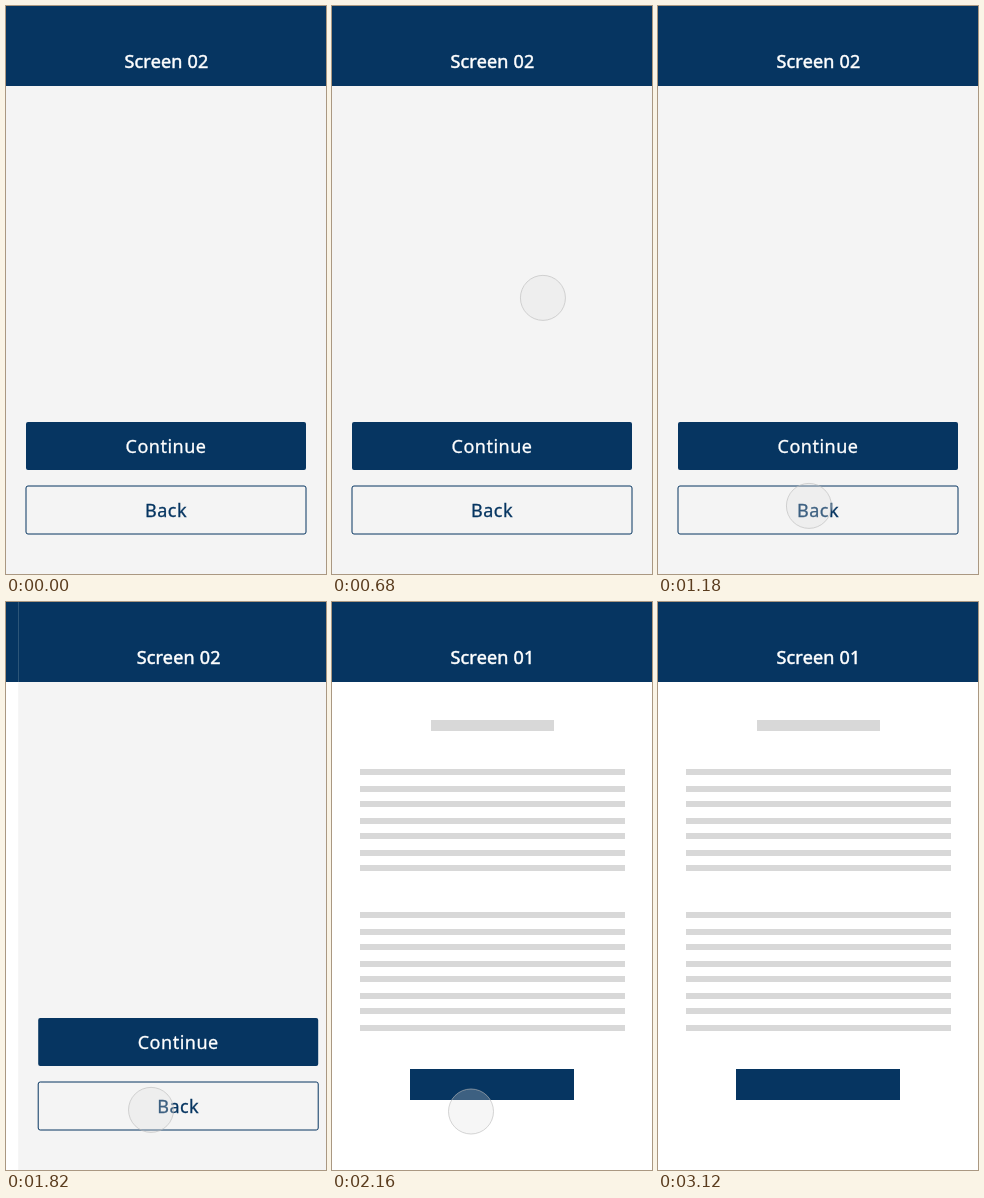
Write an HTML page that moves like this. It is 320 px wide and 568 px high and loops after 4.44 s.

```html
<!DOCTYPE html>
<html lang="en">
<head>
<meta charset="utf-8">
<title>Back transition</title>
<style>
  html, body { margin: 0; width: 100%; height: 100%; overflow: hidden; background: #fff; }
  svg { display: block; width: 100%; height: 100%; }
  text {
    font: 400 18px "Noto Sans", "Open Sans", sans-serif; letter-spacing: .5px; text-anchor: middle;
    fill: currentColor; stroke: currentColor; stroke-width: .3; color: #fff;
  }
  .title { letter-spacing: .2px; stroke-width: .5; }
  .back { color: #063561; }
  .navy { fill: #063561; }
  .grey { fill: #d8d8d8; }
</style>
</head>
<body>
<svg viewBox="0 0 320 568">
  <rect width="320" height="568" fill="#fff"/>
  <g id="first">
    <rect class="navy" width="320" height="80"/>
    <text class="title" x="160.5" y="62">Screen 01</text>
    <rect class="grey" x="99" y="118" width="123" height="11"/>
    <g id="lines"></g>
    <rect class="navy" x="78" y="467" width="164" height="31"/>
  </g>
  <g id="second">
    <rect width="320" height="568" fill="#f4f4f4"/>
    <rect class="navy" width="320" height="80"/>
    <text class="title" x="160.5" y="62">Screen 02</text>
    <rect class="navy" x="20" y="416" width="280" height="48" rx="2"/>
    <text x="160" y="447">Continue</text>
    <rect x="20" y="480" width="280" height="48" rx="2" fill="#f4f4f4" stroke="#063561"/>
    <text class="back" x="160" y="511">Back</text>
  </g>
  <circle id="touch" r="22.5" fill="rgba(220,220,220,.26)" stroke="rgba(185,185,185,.6)"/>
</svg>
<script>
const LOOP = 4440, STEP = 20;
const SLIDE = { start: 1801, length: 343 };
const $ = id => document.getElementById(id);

// Pointer strokes: Bezier control points; the pointer rests between them
const STROKES = [
  { start: 270, end: 1320, x: [311, 205.5, 152, 146], y: [-26, 281, 521, 507.6] },
  { start: 1740, end: 2160, x: [146, 144.5, 142, 139], y: [507.6, 508, 509, 509.5] },
  { start: 2240, end: 2660, x: [139, 141, 149, 157], y: [509.5, 516, 556, 592] },
  { start: 3020, end: 3120, x: [292, 294, 303, 345], y: [596, 572, 572, 596] }
];

const clamp = u => Math.min(1, Math.max(0, u));

function bezier([a, b, c, d], u) {
  const v = 1 - u;
  return a * v ** 3 + 3 * b * v * v * u + 3 * c * v * u * u + d * u ** 3;
}

// Same curve as the CSS "ease" keyword
function ease(x) {
  let lo = 0, hi = 1;
  for (let n = 0; n < 24; n++) {
    const mid = (lo + hi) / 2;
    if (bezier([0, .25, .25, 1], mid) < x) lo = mid; else hi = mid;
  }
  return bezier([0, .1, 1, 1], lo);
}

function paragraph(top, count) {
  for (let i = 0; i < count; i++) {
    const line = document.createElementNS("http://www.w3.org/2000/svg", "rect");
    const box = { class: "grey", x: 28, y: top + 16 * i + i % 2, width: 265, height: 6 };
    for (const name in box) line.setAttribute(name, box[name]);
    $("lines").append(line);
  }
}

function draw(t) {
  const shift = 320 * ease(clamp((t - SLIDE.start) / SLIDE.length));
  $("second").setAttribute("transform", `translate(${shift.toFixed(2)} 0)`);

  const stroke = STROKES.findLast(s => t >= s.start) || STROKES[0];
  const u = clamp((t - stroke.start) / (stroke.end - stroke.start));
  $("touch").setAttribute("cx", bezier(stroke.x, u).toFixed(2));
  $("touch").setAttribute("cy", bezier(stroke.y, u).toFixed(2));
}

const origin = performance.now();
function tick() {
  const t = (performance.now() - origin) % LOOP;
  draw(Math.floor(t / STEP) * STEP);
  requestAnimationFrame(tick);
}

paragraph(167, 7);
paragraph(310, 8);
draw(0);
requestAnimationFrame(tick);
</script>
</body>
</html>
```
